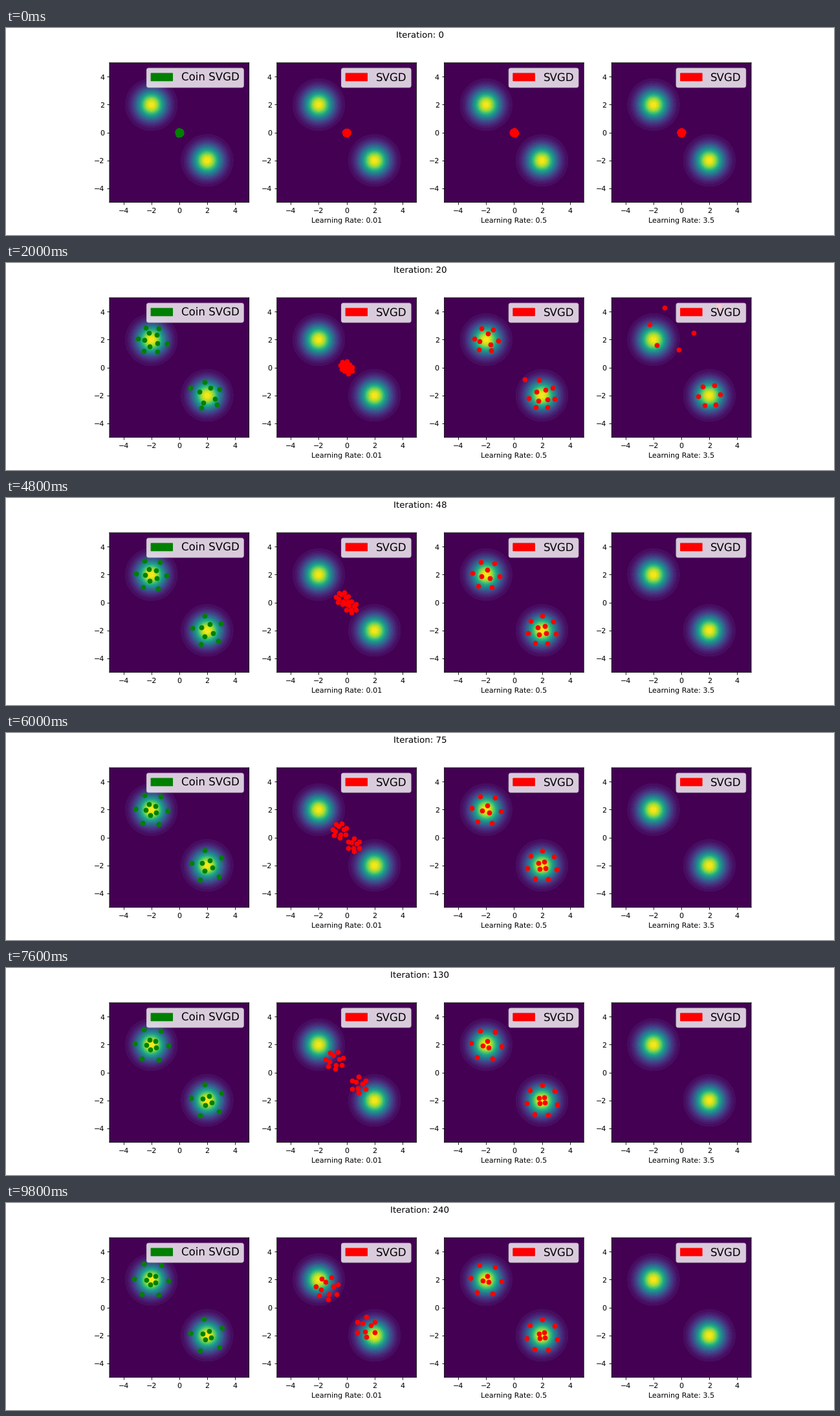
Recreate the animation shown at these times as a matplotlib script. Size 1280 px wide and 320 px high, loop 10 s.

```python
import numpy as np
import matplotlib.pyplot as plt
from matplotlib.animation import FuncAnimation
from matplotlib.patches import Patch

plt.rcParams.update({"path.snap": False, "text.hinting": "none"})

MODE = np.array([2, -2])   # second mode; the first one mirrors it
START_R = 0.15

# Rings of particles: side, count, phase, early radius, late radius,
# and the time constants of slots that lag behind.
COIN = [
    (-1, 6, 116, 0.80, 1.24, {2: 14}),
    (-1, 5, 40, 0.60, 0.36, {}),
    (1, 5, 100, 0.85, 1.20, {4: 16}),
    (1, 4, 65, 0.75, 0.33, {}),
]
MEDIUM = [
    (-1, 6, 114, 0.72, 1.12, {}),
    (-1, 3, 75, 0.60, 0.25, {}),
    (1, 7, 88, 0.85, 1.13, {0: 14, 6: 20}),
    (1, 4, 55, 0.60, 0.25, {}),
]

# Side, count, phase, relative radius.
SLOW = [(-1, 7, 69, 1), (-1, 4, 106, 0.58), (1, 6, 90, 0.9), (1, 3, 137, 0.45)]

# Count, phase, then (centre x, centre y, radius) at iterations 10, 20, 34.
FAST = [
    (6, 109, [(-2, 2, 0.8), (-0.7, 2.8, 1.6), (-0.7, 3, 0.7)]),
    (6, 125, [(2.4, -0.8, 0.55), (2, -2, 0.8), (5, 0.9, 0.55)]),
    (3, 40, [(2.4, -0.8, 0.3), (2.6, 5, 0.6), (4, 9, 0.6)]),
    (5, 90, [(2.4, -0.8, 0.2), (1, 9, 1), (2, 12, 1)]),
]


def ring(n, phase):
    a = np.radians(phase) - 2 * np.pi * np.arange(n) / n
    return np.column_stack([np.cos(a), np.sin(a)])


def settle(groups, tau, it):
    """Leave the start and spread out into rings around the modes."""
    parts = []
    for side, n, phase, early, final, late in groups:
        taus = np.array([late.get(k, tau) for k in range(n)])
        rest = np.exp(-(it / taus) ** 2)[:, None]
        unit = ring(n, phase)
        radius = final + (early - final) * np.exp(-it / 45)
        home = side * MODE + radius * unit
        parts.append(rest * START_R * unit + (1 - rest) * home)
    return np.concatenate(parts)


def creep(it):
    """Two growing patches drift slowly to the modes."""
    shift = 1 - np.exp(-(it / 206) ** 1.2)
    radius = START_R + 0.042 * np.sqrt(it)
    return np.concatenate([
        side * shift * MODE + scale * radius * ring(n, phase)
        for side, n, phase, scale in SLOW])


def scatter_off(it):
    """Burst out, regroup, then leave the panel for good."""
    parts = []
    for n, phase, keys in FAST:
        x, y, r = keys[-1]
        rows = [(0, 0, START_R), (0, 0, 3.3), *keys, (14 * x, 14 * y, r)]
        x, y, r = (np.interp(it, [0, 2, 10, 20, 34, 36], col)
                   for col in zip(*rows))
        parts.append([x, y] + r * ring(n, phase))
    return np.concatenate(parts)


panels = [
    (None, lambda it: settle(COIN, 5, it)),
    (0.01, creep),
    (0.5, lambda it: settle(MEDIUM, 3, it)),
    (3.5, scatter_off),
]
steps = [*range(0, 50, 2), *range(50, 100, 5), *range(100, 250, 10)]

fig, axes = plt.subplots(1, 4, figsize=(16, 4), dpi=80)
title = fig.suptitle("Iteration: 0")

grid = np.linspace(-5, 5, 201)
X, Y = np.meshgrid(grid, grid)
density = (np.exp(-(X + 2) ** 2 - (Y - 2) ** 2)
           + np.exp(-(X - 2) ** 2 - (Y + 2) ** 2)) / (2 * np.pi)
levels = np.arange(33) * 0.005

clouds = []
for ax, (rate, place) in zip(axes, panels):
    color, name = ("red", "SVGD") if rate else ("green", "Coin SVGD")
    ax.contourf(X, Y, density, levels=levels, cmap="viridis",
                vmin=0.0025, vmax=0.16)
    clouds.append(ax.scatter(*place(0).T, color=color))
    ax.set(xlim=(-5, 5), ylim=(-5, 5), aspect="equal",
           xticks=range(-4, 5, 2), yticks=range(-4, 5, 2))
    if rate:
        ax.set_xlabel(f"Learning Rate: {rate}")
    ax.legend(handles=[Patch(color=color, label=name)],
              loc="upper right", fontsize=15)


def update(i):
    it = steps[i]
    title.set_text(f"Iteration: {it}")
    for cloud, (_, place) in zip(clouds, panels):
        cloud.set_offsets(place(it))
    return [title, *clouds]


anim = FuncAnimation(fig, update, frames=len(steps), interval=200,
                     repeat=True, repeat_delay=0)
plt.show()
```
